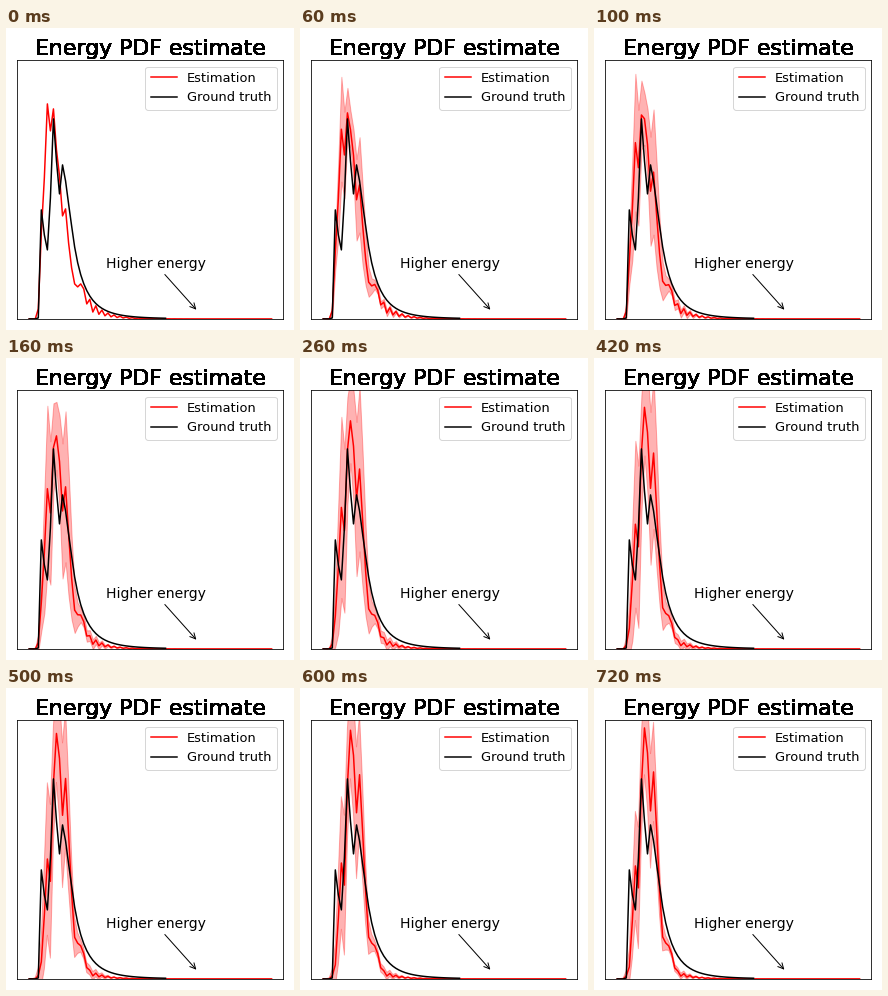
A matplotlib script for the animation above (740 ms loop, 288 by 302 pixels).

```python
import numpy as np
import matplotlib.pyplot as plt
from matplotlib.animation import FuncAnimation

W, H, DPI = 288, 302, 72
FRAMES, STEP_MS = 37, 20
LEFT, RIGHT, TOP, BOTTOM = 11.25, 277.25, 32.25, 291.25
BASE = 0.35

plt.rcParams["font.family"] = "DejaVu Sans"

bins = np.arange(81)
x = 23.2 + 3.03 * bins

# Key heights in pixels, from bin 3 on
FIRST = [10, 86, 141, 215, 188, 210, 169, 143, 103, 110, 76, 51, 35, 32, 35, 30, 15]
LAST = [3, 12, 58, 113, 91, 194, 251, 226, 168, 207, 150, 88, 42, 36, 33, 25, 11]
TRUTH = [1, 109, 84, 69, 121, 200, 158, 125, 154, 138, 115]


def bump(center, width):
    return np.exp(-((bins - center) / width) ** 2 / 2)


def curve(keys, tail):
    """Key heights followed by a given tail."""
    y = np.where(bins < 3, 0.0, tail)
    y[3:3 + len(keys)] = keys
    return y


ripple = 14 * np.exp(-(bins - 20) / 5) * (1 + 0.4 * (-1.0) ** bins)
first = curve(FIRST, ripple)
last = curve(LAST, 0.4 * ripple)

past = np.maximum(bins - 14, 0)
truth = curve(TRUTH, 93 * np.exp(-past / (3.8 + 0.08 * past)))

# Widest spread per bin, and the step at which it is reached
spread = 90 * bump(6.2, 1.5) + 82 * bump(11.7, 2) + 6 * bump(19, 4)
widest_at = 13 + 13 * bump(9, 1.2)


def settle(step, pace=11):
    return (1 - np.exp(-step / pace)) / (1 - np.exp(-(FRAMES - 1) / pace))


def estimate(step):
    """Mean curve and half-width of its band."""
    mean = first + (last - first) * settle(step)
    t = step / widest_at
    half = spread * (t * np.exp(1 - t)) ** 0.75
    return mean + BASE, half


fig = plt.figure(figsize=(W / DPI, H / DPI), dpi=DPI, facecolor="white")
ax = fig.add_axes([LEFT / W, 1 - BOTTOM / H, (RIGHT - LEFT) / W, (BOTTOM - TOP) / H])
ax.set(xlim=(LEFT, RIGHT), ylim=(0, BOTTOM - TOP), xticks=[], yticks=[])

line, = ax.plot([], [], color="red", lw=1.5, label="Estimation")
ax.plot(x[:46], truth[:46] + BASE, color="black", lw=1.5, label="Ground truth")
ax.legend(loc="upper right", fontsize=13)

# Overprinting gives the title its heavy, hard edges
for _ in range(30):
    ax.text((LEFT + RIGHT) / 2, BOTTOM - 27.3, "Energy PDF estimate",
            fontsize=22, ha="center", va="baseline")

ax.annotate("Higher energy", xy=(191.7, BOTTOM - 283.2), xytext=(99.5, BOTTOM - 240),
            fontsize=14, arrowprops=dict(arrowstyle="->", lw=1, color="black"))

bands = []


def draw(step):
    while bands:
        bands.pop().remove()
    mean, half = estimate(step)
    line.set_data(x, mean)
    if step:
        bands.append(ax.fill_between(x, mean - half, mean + half,
                                     color="red", alpha=0.3, lw=1))
    return [line, *bands]


anim = FuncAnimation(fig, draw, frames=FRAMES, init_func=lambda: draw(0),
                     interval=STEP_MS, repeat=True, repeat_delay=0, blit=False)
plt.show()
```
